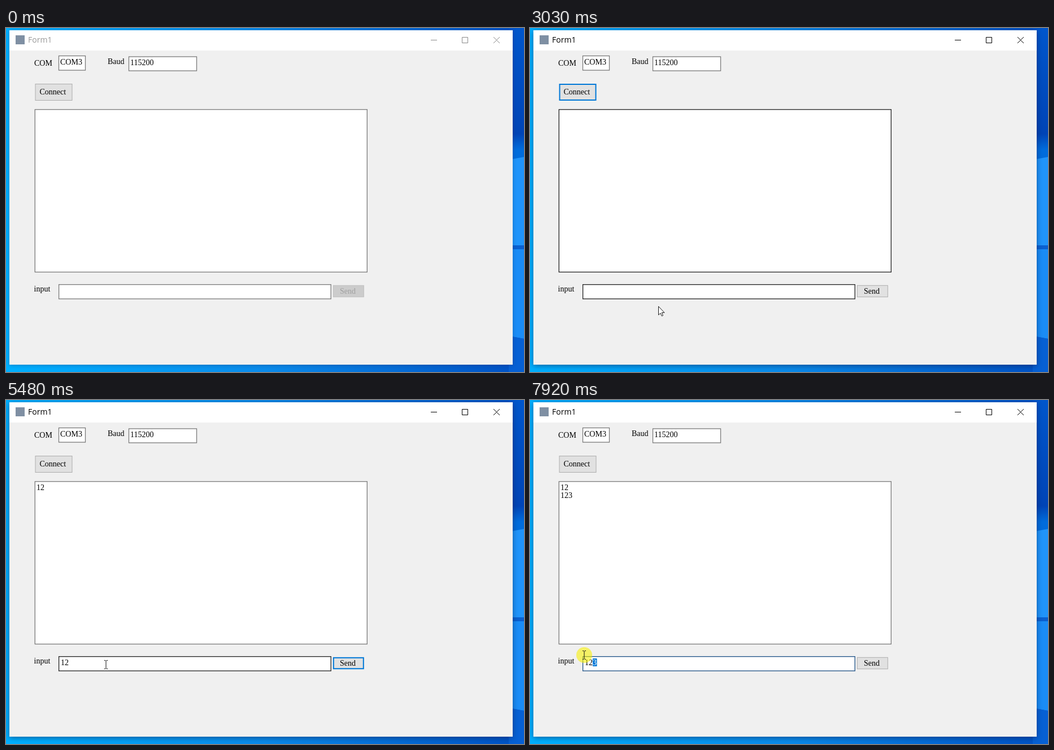
Animation, 917 px wide and 611 px high, one loop 7990 ms. Source, as an HTML page:

```html
<!DOCTYPE html>
<html lang="en">
<head>
<meta charset="utf-8">
<title>Form1</title>
<style>
  html, body { margin: 0; width: 100%; height: 100%; overflow: hidden; }
  svg { display: block; width: 917px; height: 611px; }
  text { font: 14px "Liberation Serif", "Times New Roman", serif; white-space: pre; }
  .box { fill: #fff; stroke: #7a7a7a; stroke-width: 1.3; }
  #frame { fill: #f0f0f0; filter: drop-shadow(0 1px 3px rgba(0, 20, 60, .3)); }
  #title { font: 14px "Open Sans", sans-serif; fill: #999; }
  #controls { fill: none; stroke: #8a8a8a; }
  .active #frame { filter: drop-shadow(0 2px 5px rgba(0, 20, 60, .5)); }
  .active #title { fill: #000; }
  .active #controls { stroke: #000; }
</style>
</head>
<body>
<svg id="stage" viewBox="0 0 917 611">
  <defs>
    <linearGradient id="sky">
      <stop offset="0" stop-color="#00b0ff"/>
      <stop offset=".5" stop-color="#0a8aea"/>
      <stop offset="1" stop-color="#0050c4"/>
    </linearGradient>
    <linearGradient id="edge" x2="0" y2="1">
      <stop offset="0" stop-color="#0056cc"/>
      <stop offset=".8" stop-color="#0044b6"/>
      <stop offset=".92" stop-color="#006cdc"/>
    </linearGradient>
  </defs>

  <rect width="917" height="611" fill="url(#sky)"/>
  <rect x="890" width="27" height="235" fill="url(#edge)"/>
  <path d="M890 234L917 229V386H890Z" fill="#2094fa"/>
  <path d="M890 386H917V393H890Z" fill="#0a60d0"/>
  <path d="M890 393H917V552L890 547Z" fill="#1a8cf6"/>
  <path d="M890 547L917 552V611H890Z" fill="#0660d4"/>

  <rect id="frame" x="6" y="4" width="891" height="594"/>
  <rect x="6" y="4" width="891" height="36" fill="#fff"/>
  <rect x="17" y="13" width="16" height="16" fill="#7f8fa3"/>
  <text id="title" x="39" y="26">Form1</text>
  <path id="controls" d="M752 21.5H763M807.5 16.5H817.5V26.5H807.5ZM863 16L874 27M874 16L863 27"/>

  <text x="50" y="67">COM</text>
  <rect class="box" x="93.5" y="49.5" width="47" height="25.5"/>
  <text x="96" y="65">COM3</text>
  <text x="180" y="64">Baud</text>
  <rect class="box" x="217.5" y="51" width="120" height="25"/>
  <text x="220" y="66">115200</text>

  <rect id="connect"/>
  <text x="59.5" y="118">Connect</text>

  <rect id="output" class="box"/>
  <text id="line1" x="54" y="160">12</text>
  <text id="line2" x="54" y="174">123</text>

  <text x="49.5" y="467.5">input</text>
  <rect id="input" class="box"/>
  <rect id="mark" y="459" height="14" fill="#0078d7"/>
  <text id="typed" x="97" y="471"></text>
  <text id="chosen" y="471" fill="#fff"></text>
  <path id="caret" d="M1.5 459V473" stroke="#000"/>

  <rect id="send"/>
  <text id="sendText" x="591" y="472">Send</text>

  <circle id="press" r="14" fill="#f8f000" fill-opacity=".58"/>
  <path id="arrow" d="M.5 .5V15.7L4 12.5 6.3 17.6 8.5 16.6 6.3 11.6H11Z" fill="#fff" stroke="#000" stroke-width=".9"/>
  <path id="beam" d="M-3 -7.5H-1L0 -6.5 1 -7.5H3M0 -6.5V6.5M-3 7.5H-1L0 6.5 1 7.5H3" fill="none" stroke="#111"/>
</svg>
<script>
const LOOP = 7990, DIGIT = 7, TEXT_X = 97;
const $ = id => document.getElementById(id);
const set = (id, attrs) => {
  for (const k in attrs) $(id).setAttribute(k, attrs[k]);
};
const show = (id, on) => { $(id).style.display = on ? "" : "none"; };

// x, y, width, height
const bounds = {
  connect: [51.5, 99, 66, 30],
  output: [51.3, 144.8, 588, 288.7],
  input: [93.6, 455.7, 481.6, 25.4],
  send: [578.8, 456.8, 55, 21.4]
};

// Pointer moves: start, end, destination
const moves = [
  [160, 920, 560, 535], [990, 1140, 629, 410], [1140, 1740, 78, 118],
  [2690, 3030, 227, 494], [3100, 3370, 197, 467], [4350, 4640, 606, 480],
  [4700, 4800, 614, 466], [5200, 5480, 177, 470], [5750, 5960, 32, 455],
  [6100, 6440, 107, 463], [6570, 6870, 612, 467], [7240, 7560, 196, 466],
  [7780, 7915, 96, 453]
];
// Pressed, released, control that takes the focus
const presses = [
  [2150, 2380, "connect"], [3440, 3580, "input"], [4950, 5090, "send"],
  [5750, 6080, "input"], [6950, 7060, "send"], [7560, LOOP, "input"]
];

function ease(u) {
  const k = 1 - (1 - u) ** 1.3;
  return k * k * (3 - 2 * k);
}

function pointer(t) {
  let x = 832, y = 612;
  for (const [from, to, toX, toY] of moves) {
    const k = ease(Math.min(1, Math.max(0, (t - from) / (to - from))));
    x += (toX - x) * k;
    y += (toY - y) * k;
  }
  return [x, y];
}

function over(id, t) {
  const [px, py] = pointer(t), [x, y, w, h] = bounds[id];
  return px >= x && px <= x + w && py >= y && py <= y + h;
}

// Borders stay lit for a moment after the pointer leaves
const lit = (id, t) => [0, 1, 2, 3, 4, 5].some(i => over(id, t - i * 30));

function drawButton(id, t, focused, pressed, enabled) {
  const hover = over(id, t);
  const [fill, stroke, line] =
    !enabled ? ["#ccc", "#bfbfbf", 1] :
    hover && pressed ? ["#cce4f7", "#005499", 1.3] :
    hover ? ["#e5f1fb", "#0078d7", 1] :
    focused ? ["#e1e1e1", "#0078d7", 2] :
    ["#e1e1e1", "#adadad", 1];
  const [x, y, width, height] = bounds[id];
  set(id, {
    x: x + line / 2, y: y + line / 2, width: width - line, height: height - line,
    fill, stroke, "stroke-width": line
  });
}

function drawBox(id, t, focused, pressed) {
  $(id).style.stroke =
    focused ? (pressed ? "#1c4f84" : "#0078d7") : lit(id, t) ? "#222" : "#7a7a7a";
}

function drawInput(t, focused, pressed) {
  const retyping = t >= 6170;
  const [word, start] = retyping ? ["123", 6170] : ["12", 4110];
  const text = t < 5750 || retyping
    ? word.slice(0, Math.max(0, Math.ceil((t - start) / 130)))
    : word;

  // Dragging selects the digits to the right of the pointer
  const dragging = t >= 7560 || (t >= 5750 && !retyping);
  const digit = Math.round((pointer(t - 50)[0] - TEXT_X) / DIGIT);
  const from = dragging ? Math.min(text.length, Math.max(0, digit)) : text.length;
  const x = TEXT_X + from * DIGIT;
  $("typed").textContent = text.slice(0, from);
  $("chosen").textContent = text.slice(from);
  set("chosen", { x });
  set("mark", { x, width: (text.length - from) * (DIGIT + .5) });
  show("caret", focused && !dragging);
  set("caret", { transform: `translate(${x})` });
}

function draw(t) {
  const last = presses.filter(p => p[0] <= t).pop();
  const focus = last && last[2], pressed = !!last && t < last[1];
  const enabled = t >= 2430;

  $("stage").classList.toggle("active", !!last);
  drawButton("connect", t, focus === "connect", pressed, true);
  drawButton("send", t, focus === "send", pressed, enabled);
  set("sendText", { fill: enabled ? "#000" : "#a0a0a0" });
  drawBox("output", t, false, pressed);
  drawBox("input", t, focus === "input", pressed);
  drawInput(t, focus === "input", pressed);
  show("line1", t >= 5090);
  show("line2", t >= 7060);

  const [x, y] = pointer(t);
  const beam = over("output", t) || over("input", t) || (pressed && focus === "input");
  show("beam", beam);
  show("arrow", !beam && t >= 160);
  show("press", pressed);
  const transform = `translate(${Math.round(x)} ${Math.round(y)})`;
  for (const id of ["arrow", "beam", "press"]) set(id, { transform });
}

for (const id in bounds) {
  const [x, y, width, height] = bounds[id];
  set(id, { x, y, width, height });
}

function tick() {
  draw(performance.now() % LOOP);
  requestAnimationFrame(tick);
}
tick();
</script>
</body>
</html>
```
